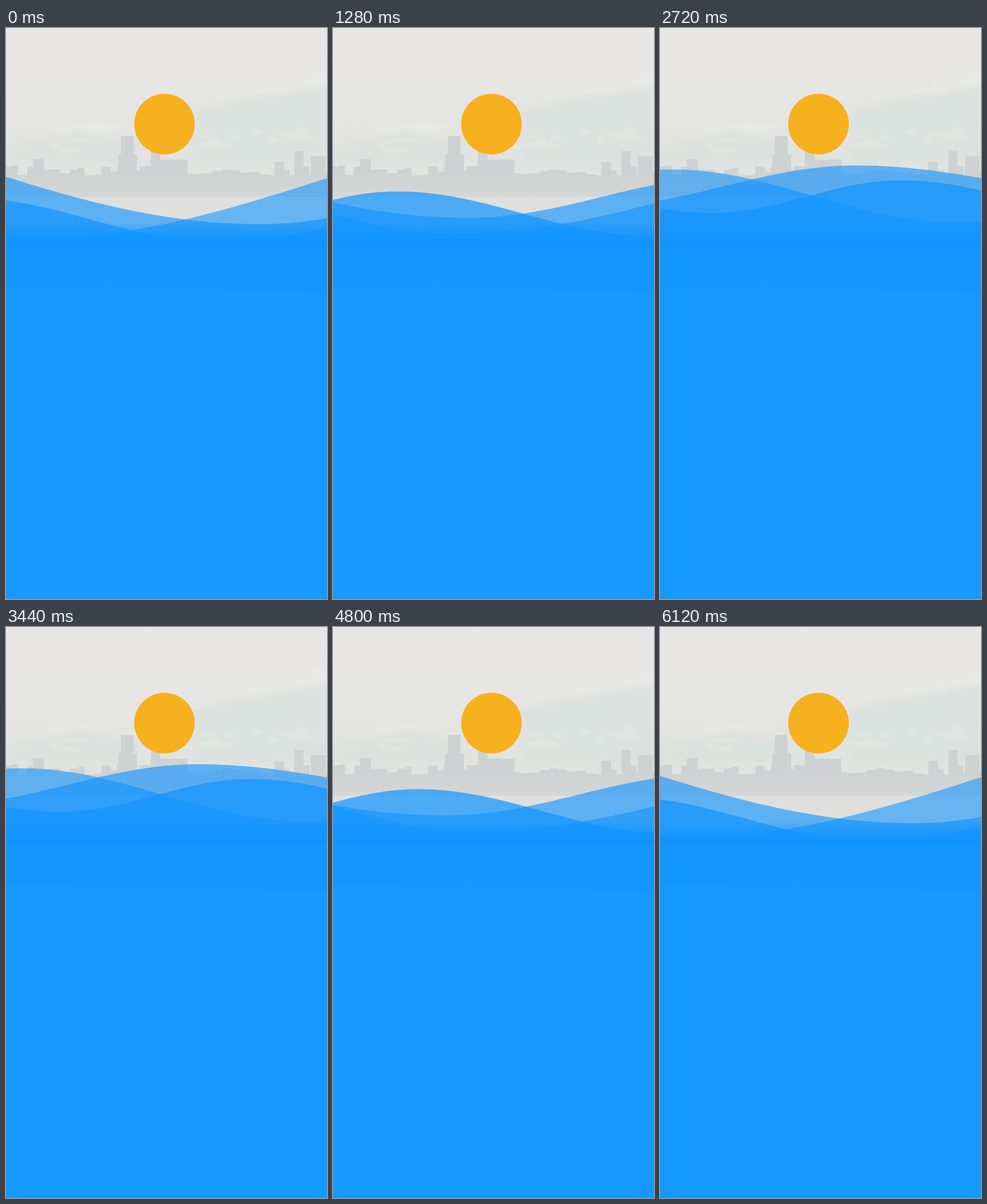
An HTML page for the animation above (6.16 s loop, 561 by 998 pixels).

```html
<!DOCTYPE html>
<html lang="en">
<head>
<meta charset="utf-8">
<title>Waves</title>
<style>
  html, body { margin: 0; width: 100%; height: 100%; overflow: hidden; background: #1699ff; }
  svg { display: block; width: 100%; height: 100%; }
</style>
</head>
<body>
<svg viewBox="0 0 561 998" preserveAspectRatio="none">
  <defs>
    <linearGradient id="sky" x2="0" y2="1">
      <stop offset="0" stop-color="#e8e7e6"/>
      <stop offset=".4" stop-color="#e5e5e3"/>
      <stop offset=".75" stop-color="#dee2df"/>
      <stop offset="1" stop-color="#dddedc"/>
    </linearGradient>
    <linearGradient id="town" gradientUnits="userSpaceOnUse" x1="0" y1="190" x2="0" y2="296">
      <stop offset="0" stop-color="#cdd1d1"/>
      <stop offset=".6" stop-color="#cfd2d2"/>
      <stop offset="1" stop-color="#d6d7d6"/>
    </linearGradient>
    <linearGradient id="depth" x2="0" y2="1">
      <stop offset="0" stop-color="#1496ff" stop-opacity="0"/>
      <stop offset="1" stop-color="#1496ff"/>
    </linearGradient>
    <filter id="soft" x="-20%" y="-50%" width="140%" height="200%"><feGaussianBlur stdDeviation="6"/></filter>
    <filter id="puff" x="-20%" y="-50%" width="140%" height="200%"><feGaussianBlur stdDeviation="2"/></filter>
  </defs>
  <rect width="561" height="998" fill="#1699ff"/>
  <rect width="561" height="376" fill="url(#sky)"/>
  <g fill="#dbe1de" filter="url(#soft)">
    <path d="M330 142L561 98V235H330Z"/>
    <path d="M0 208L130 182 230 200V235H0Z"/>
  </g>
  <g id="clouds" fill="#eaebe7" opacity=".5" filter="url(#puff)"></g>
  <path id="skyline" fill="url(#town)"/>
  <rect y="295" width="561" height="81" fill="#dfe0de"/>
  <rect y="340" width="561" height="36" fill="url(#depth)"/>
  <path d="M0 376H561V463L370 459 90 451H0Z" fill="#1496ff"/>
  <circle cx="277" cy="168" r="53" fill="#f7b01e"/>
  <g id="waves" fill="#1094ff"></g>
</svg>
<script>
const LOOP = 6160, STEP = 40, LAG = 30, WIDTH = 561, FLOOR = 380, RISE = 32;
const byId = id => document.getElementById(id);

function add(parent, tag, attributes) {
  const node = document.createElementNS("http://www.w3.org/2000/svg", tag);
  for (const name in attributes) node.setAttribute(name, attributes[name]);
  return parent.appendChild(node);
}

let seed = 7;
const random = (min, max) => {
  seed = seed * 16807 % 2147483647;
  return min + (max - min) * seed / 2147483647;
};

const ease = k => (1 - Math.cos(Math.PI * k)) / 2;

// Height of a wave that eases from one crest or trough to the next
function height(turns, x) {
  let i = 0;
  while (i < turns.length - 2 && x > turns[i + 1][0]) i++;
  const [x0, y0] = turns[i], [x1, y1] = turns[i + 1];
  return y0 + (y1 - y0) * ease((x - x0) / (x1 - x0));
}

// Turning points lie on a fixed curve that slides by `travel` and back
const waves = [
  { alpha: .58, travel: -510, turns: [[-470, 278], [25, 370.5], [1135, 142]] },
  { alpha: .62, travel: 585, turns: [[-575, 136], [445, 343], [905, 271], [1400, 325]] },
  { alpha: .7, travel: -510, turns: [[-730, 310], [-400, 354], [-69, 297], [370, 374], [752, 324]] }
];
for (const wave of waves) wave.path = add(byId("waves"), "path", { "fill-opacity": wave.alpha });

function drawClouds(left, right, yLeft, yRight, count) {
  for (let i = 0; i < count; i++) {
    const k = random(0, 1);
    add(byId("clouds"), "ellipse", {
      cx: left + (right - left) * k,
      cy: yLeft + (yRight - yLeft) * k + random(-9, 9),
      rx: random(8, 24),
      ry: random(1, 5)
    });
  }
}
drawClouds(335, 561, 134, 92, 20);
drawClouds(520, 561, 75, 75, 5);
drawClouds(340, 540, 200, 182, 12);
drawClouds(70, 205, 186, 170, 10);
drawClouds(0, 130, 210, 205, 6);

function drawSkyline() {
  let d = "";
  const block = (x, width, top) => d += `M${x} 296V${top}h${width}V296Z`;
  for (let x = 0; x < WIDTH;) {
    const width = random(9, 22);
    block(x, width + 1, random(240, 258));
    x += width;
  }
  block(47, 19, 229);
  block(201, 22, 189);
  block(196, 33, 221);
  block(253, 17, 214);
  block(270, 47, 230);
  block(469, 17, 234);
  block(504, 16, 215);
  block(533, 26, 224);
  byId("skyline").setAttribute("d", d);
}
drawSkyline();

function draw(t) {
  const swing = ease(2 * (t - LAG) / LOOP);
  for (const { path, travel, turns } of waves) {
    let d = `M0 ${FLOOR}`;
    for (let x = 0; x <= WIDTH + 3; x += 4) {
      d += `L${x} ${(height(turns, x + travel * swing) - RISE * swing).toFixed(2)}`;
    }
    path.setAttribute("d", d + `V${FLOOR}Z`);
  }
}

const start = performance.now();
function tick() {
  const t = (performance.now() - start) % LOOP;
  draw(Math.floor(t / STEP) * STEP);
  requestAnimationFrame(tick);
}
tick();
</script>
</body>
</html>
```
